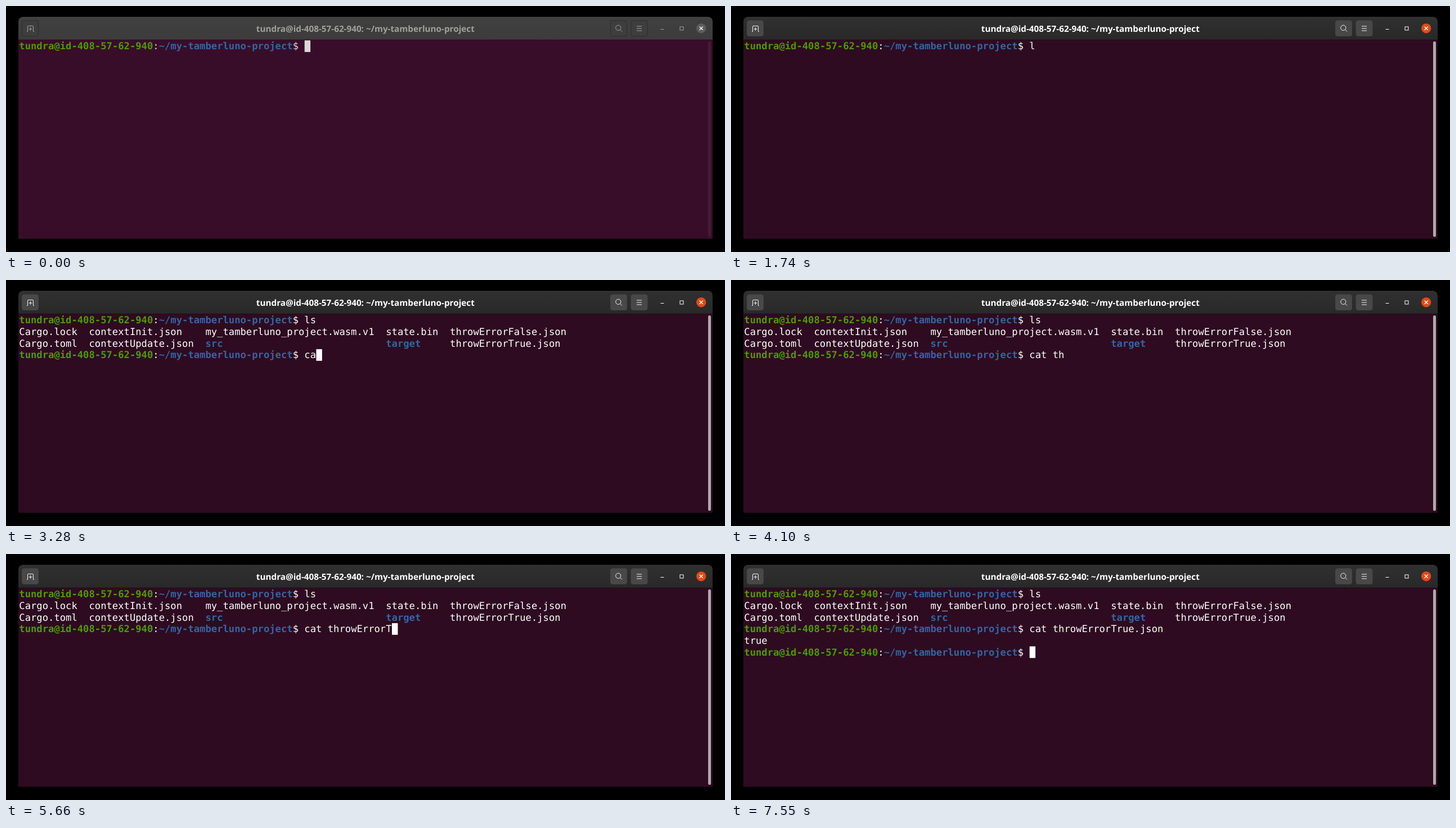
An HTML page for the animation above (8 s loop, 1278 by 438 pixels).

```html
<!DOCTYPE html>
<html lang="en">
<head>
<meta charset="utf-8">
<title>Terminal</title>
<style>
html, body { margin: 0; width: 100%; height: 100%; overflow: hidden; background: #000; }
svg {
  display: block; width: 1278px; height: 438px;
  --top: #303030; --bar: #292929; --body: #2e0b21; --ink: #fff; --title: #fff;
  --button: #484848; --edge: #464646; --icon: #f2f2f2; --close: #dd4d18; --scroll: #aeaaab;
}
svg[data-focus="0"] {
  --top: #404040; --bar: #3c3c3c; --body: #380d29; --ink: #dcd8d8; --title: #a09f9d;
  --button: #3e3e3e; --edge: #2c2c2c; --icon: #a5a5a5; --close: #5c5c5c; --scroll: #431c35;
}
svg[data-focus="1"] { --button: #444; --edge: #424242; --icon: #c8c8c8; }
#title { font: 700 15.26px "Open Sans", "Noto Sans", sans-serif; fill: var(--title); text-anchor: middle; }
#lines { font: 17.2px "DejaVu Sans Mono", monospace; fill: var(--ink); }
text { white-space: pre; text-rendering: geometricPrecision; }
.user { fill: #4e9a06; font-weight: 700; }
.dir { fill: #3465a4; font-weight: 700; }
.button { fill: var(--button); stroke: var(--edge); }
.icon { fill: none; stroke: var(--icon); }
.sharp { stroke: var(--title); }
</style>
</head>
<body>
<svg id="stage" viewBox="0 0 1278 438" data-focus="0">
  <defs>
    <linearGradient id="shade" x2="0" y2="1">
      <stop stop-color="var(--top)"/>
      <stop offset="1" stop-color="var(--bar)"/>
    </linearGradient>
  </defs>
  <path d="M22 60V28q0-8.500 8.500-8.500H1247.500q8.500 0 8.500 8.500V60z" fill="url(#shade)"/>
  <path d="M28 20H1250" stroke="#fff" stroke-opacity=".08"/>
  <rect x="22" y="60" width="1234" height="354.500" fill="var(--body)"/>
  <path d="M22 60H1256" stroke="#000" stroke-opacity=".25"/>
  <rect x="1248" y="63" width="5" height="348" rx="2.500" fill="var(--scroll)"/>

  <g class="button">
    <rect x="28.500" y="26" width="29" height="27.500" rx="3.500"/>
    <rect x="1074.500" y="26" width="29" height="27.500" rx="3.500"/>
    <rect x="1111" y="26" width="29" height="27.500" rx="3.500"/>
  </g>
  <g class="icon">
    <path d="M37 45.500H38.500V37q0-1.500 1.500-1.500H47q1.500 0 1.500 1.500V45.500H50M43.500 38V44M40.500 41H46.500"/>
    <circle cx="1088.300" cy="38.800" r="4.600"/>
    <path d="M1091.700 42.200L1095 45.500"/>
    <path d="M1121 36H1130M1121 40H1130M1121 44H1130"/>
  </g>
  <g class="icon sharp">
    <path d="M1163.500 41.500H1169.500"/>
    <rect x="1198" y="37" width="6" height="6"/>
  </g>
  <circle cx="1235.700" cy="39.700" r="8.700" fill="var(--close)"/>
  <path d="M1232.700 36.700l6 6m0-6l-6 6" stroke="#fff" stroke-width="1.300"/>
  <text id="title" x="638.800" y="45.500"></text>
  <g id="lines"></g>
  <rect id="cursor" width="10.400" height="20.700" fill="var(--ink)"/>
</svg>
<script>
const LOOP = 8000, LEFT = 23.3, TOP = 61.2, CELL = 10.355, LINE = 20.65;
const $ = id => document.getElementById(id);
const user = 'tundra@id-408-57-62-940', path = '~/my-tamberluno-project';
const span = (name, text) => `<tspan class="${name}">${text}</tspan>`;
const dir = (text, width) => span('dir', text.padEnd(width));
const prompt = span('user', user) + ':' + span('dir', path) + '$ ';
const promptWidth = user.length + path.length + 3;

const listing = [
  'Cargo.lock  contextInit.json    my_tamberluno_project.wasm.v1  state.bin  throwErrorFalse.json',
  'Cargo.toml  contextUpdate.json  ' + dir('src', 31) + dir('target', 11) + 'throwErrorTrue.json'
];
const full = 'cat throwErrorTrue.json ';

// [start time, command being typed, cursor visible]
const steps = [
  [0, '', 1], [580, '', 0], [820, '', 1], [1050, 'l', 1], [1740, 'l', 0],
  [2330, '', 1], [3050, 'c', 1], [3220, 'ca', 1], [3290, 'cat', 1], [3350, 'cat ', 1],
  [3520, 'cat t', 1], [3620, 'cat th', 1], [4100, 'cat th', 0], [4710, 'cat th', 1],
  [4780, 'cat throwError', 1], [5240, 'cat throwError', 0], [5330, 'cat throwError', 1],
  [5660, 'cat throwErrorT', 1], [5830, full, 1], [6140, full, 0], [6300, full, 1],
  [6880, full, 0], [7550, '', 1]
];

function show(step) {
  const [time, typed, lit] = step;
  const lines = [];
  if (time >= 2330) lines.push(prompt + 'ls', ...listing);
  if (time >= 7550) lines.push(prompt + full, 'true');
  const row = lines.length;
  lines.push(prompt + typed);
  $('lines').innerHTML = lines.map((line, i) =>
    `<text x="${LEFT}" y="${TOP + 16.1 + i * LINE}">${line}</text>`).join('');
  $('cursor').setAttribute('x', LEFT + (promptWidth + typed.length) * CELL);
  $('cursor').setAttribute('y', TOP + row * LINE);
  $('cursor').setAttribute('opacity', lit);
}

let current;
function draw(now) {
  const t = now % LOOP;
  const step = steps.findLast(s => s[0] <= t);
  if (step !== current) show(current = step);
  $('stage').dataset.focus = t < 90 ? 0 : t < 160 ? 1 : 2;
}

$('title').textContent = `${user}: ${path}`;
draw(0);
const start = performance.now();
requestAnimationFrame(function tick() {
  draw(performance.now() - start);
  requestAnimationFrame(tick);
});
</script>
</body>
</html>
```
